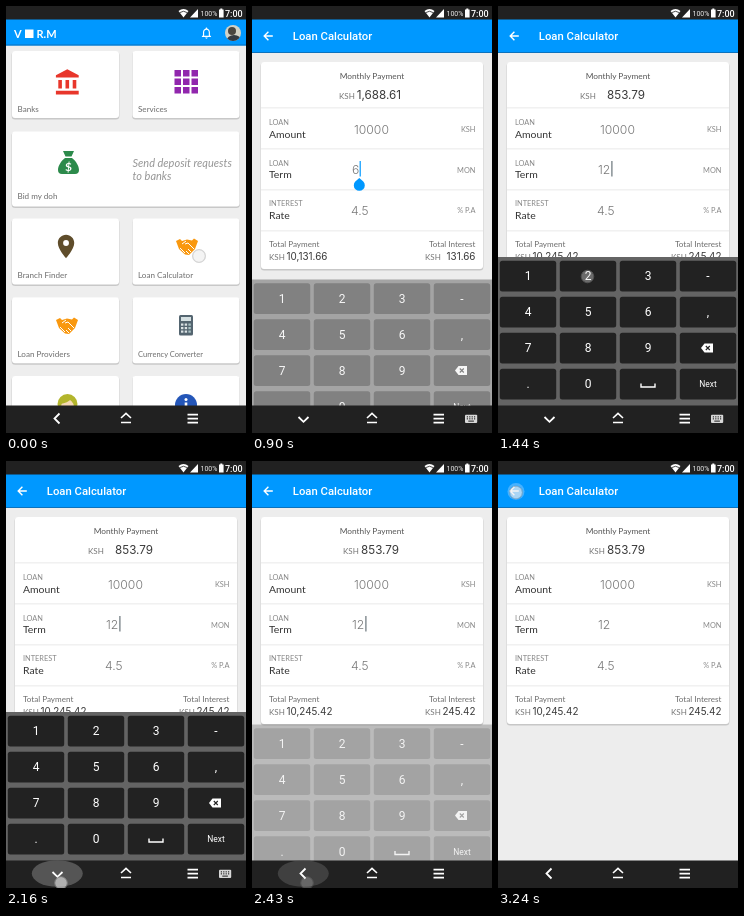
An HTML page for the animation above (3.27 s loop, 240 by 427 pixels).

```html
<!DOCTYPE html>
<html lang="en">
<head>
<meta charset="utf-8">
<title>Loan calculator</title>
<style>
html, body { margin: 0; width: 100%; height: 100%; overflow: hidden; background: #212121; }
svg { display: block; width: 100vw; height: 100vh; font-family: Lato, "Open Sans", sans-serif; }
.sys { font-family: Roboto, "Noto Sans", sans-serif; }
.label { font-size: 8.1px; fill: #6c6c6c; }
.cap { font-size: 7.4px; fill: #888; }
.name { font-size: 10.4px; fill: #333; }
.ksh { font-size: 8px; fill: #777; }
.input, .sum, .big { font-family: Inter, "Open Sans", sans-serif; fill: #3a3a3a; }
.input { font-size: 12.2px; font-weight: 300; fill: #777; }
.sum { font-size: 9.9px; }
.big { font-size: 11.7px; }
.line { fill: none; stroke: #fff; stroke-width: 1.8; }
.bold { font-weight: 700; fill: #fff; }
.title { font-size: 11.3px; font-weight: 500; fill: #fff; }
.end { text-anchor: end; }
.mid { text-anchor: middle; }
</style>
</head>
<body>
<svg id="stage" viewBox="0 0 240 427" preserveAspectRatio="none"></svg>
<script>
const LOOP = 3270, STEP = 30;
const BLUE = '#0098ff', EDGE = '#0b72bd', BAR = '#212121', KEY = '#222', KEY_DOWN = '#2e2e2e';

const text = (x, y, cls, str, more = '') => `<text x="${x}" y="${y}" class="${cls}" ${more}>${str}</text>`;
const rect = (x, y, w, h, fill, more = '') => `<rect x="${x}" y="${y}" width="${w}" height="${h}" fill="${fill}" ${more}/>`;
const path = (d, more = '') => `<path d="${d}" ${more}/>`;
const at = (x, y, s, body) => `<g transform="translate(${x} ${y}) scale(${s})">${body}</g>`;
const card = (x, y, w, h) =>
  rect(x - .4, y + .6, w + .8, h + .9, '#000', 'rx="3.5" opacity=".16"') + rect(x, y, w, h, '#fff', 'rx="3"');
const grid = (cols, rows, fn) =>
  Array.from({ length: cols * rows }, (_, i) => fn(i % cols, Math.floor(i / cols), i)).join('');
const appBar = bottom => rect(0, 13, 240, bottom - 13, BLUE) + rect(0, bottom - 1, 240, 1, EDGE);

const handshake = (x, y) => at(x, y, 1, `<g fill="#f9980f">
  ${path('M-11 -6L-7 -8L-5 -6L0 -7.5L5 -6.5L7 -8.5L11 -6L8 2L2 8L-2 7.5L-8 2Z')}</g>
  ${path('M-5 -3L-1 -6M-2 -3L1 -4L7 2M-7 1L-2 6M1 2L4 5M-1 4L2 7', 'fill="none" stroke="#fff" stroke-width="1"')}`);

function home() {
  const bank = path('M4 10v7h3v-7zM10 10v7h3v-7zM2 22h19v-3H2zM16 10v7h3v-7zM11.5 1L2 6v2h19V6z', 'fill="#e8362b"');
  const pin = path('M12 2C8.1 2 5 5.1 5 9c0 5.3 7 13 7 13s7-7.7 7-13c0-3.9-3.1-7-7-7zm0 9.5a2.5 2.5 0 1 1 0-5 2.5 2.5 0 0 1 0 5z', 'fill="#5f4d2b"');
  const bell = path('M12 22c1.1 0 2-.9 2-2h-4c0 1.1.9 2 2 2zM18 16v-5c0-3-1.6-5.6-4.5-6.3V4a1.5 1.5 0 0 0-3 0v.7C7.6 5.4 6 8 6 11v5l-2 2v1h16v-1zM16 17H8v-6c0-2.5 1.5-4.5 4-4.5s4 2 4 4.5z', 'fill="#fff" fill-rule="evenodd"');
  const bag = path('M57 145h11l-2.5 5.5h-6zM59 152h7c4 3 7 8 7 12q0 4-4 4h-13q-4 0-4-4c0-4 3-9 7-12z', 'fill="#2c8a4b"')
    + text(62.5, 165, 'mid', '$', 'font-size="12" font-weight="700" fill="#fff"');
  const calc = rect(173, 309, 14, 20.5, '#546570', 'rx="1.5"') + rect(175, 311, 10, 4, '#d5e0e2')
    + grid(3, 3, (c, r) => rect(175 + c * 3.7, 317.5 + r * 3.5, 2.4, 2.2, c == 2 ? '#a9c2c4' : '#dce3e5'));
  const face = '<ellipse cx="61.5" cy="398" rx="10" ry="10" fill="#b3b52c"/>'
    + '<ellipse cx="61.5" cy="401" rx="6.5" ry="7.5" fill="#f6d9b6"/>' + path('M54 398q8-1 11-5q1 4 4 5l-1-7h-13z', 'fill="#b3b52c"');
  const info = '<circle cx="180" cy="399" r="11" fill="#2456b8"/><circle cx="180" cy="393.5" r="1.5" fill="#fff"/>' + rect(178.7, 396.5, 2.6, 9, '#fff');
  const person = '<clipPath id="round"><circle cx="227" cy="27" r="8"/></clipPath><g clip-path="url(#round)">'
    + rect(219, 19, 16, 16, '#d3d2c6') + '<circle cx="226" cy="25" r="4" fill="#494640"/><ellipse cx="228" cy="35" rx="7.5" ry="6" fill="#353b42"/></g>';

  return rect(0, 13, 240, 387, '#eee')
    + card(6, 45, 107, 67) + card(126.5, 45, 107, 67) + card(6, 125.5, 227.5, 75)
    + grid(2, 3, (c, r) => card(6 + c * 120.5, 212.5 + r * 78.7, 107, 66))
    + at(47.5, 62, 1.2, bank)
    + grid(3, 3, (c, r) => rect(168.5 + c * 8.5, 64 + r * 8.5, 6.5, 6.5, '#9127ad'))
    + bag + at(46, 226.5, 1.17, pin) + handshake(181, 241) + handshake(61, 320) + calc + face + info
    + [[11.5, 106, 'Banks'], [132, 106, 'Services'], [11.5, 193, 'Bid my doh'], [11.5, 272, 'Branch Finder'],
       [132, 272, 'Loan Calculator'], [11.5, 351, 'Loan Providers']].map(a => text(a[0], a[1], 'label', a[2])).join('')
    + text(132, 351, 'label', 'Currency Converter', 'style="font-size:7.5px"')
    + ['Send deposit requests', 'to banks'].map((s, i) => text(126.5, 161 + i * 12.5, '', s, 'font-size="11" font-style="italic" fill="#969696"')).join('')
    + appBar(39.5)
    + text(8, 32, 'bold', 'V', 'font-size="11"') + rect(19, 23.5, 8.5, 8.5, '#fff') + text(30.5, 32, 'bold', 'R.M', 'font-size="11"')
    + at(193.5, 20, .58, bell) + person;
}

function calculator() {
  const row = (y, cap, name, unit) => text(17, y, 'cap', cap) + text(17, y + 12.5, 'name', name) + text(223.5, y + 7, 'cap end', unit);
  return rect(0, 13, 240, 418, '#ededed') + card(9, 56, 222, 207)
    + [101.5, 142.5, 183.5, 224.5].map(y => rect(9, y, 222, .8, '#e3e3e3')).join('')
    + text(120, 72.5, 'mid', 'Monthly Payment', 'font-size="8.3" fill="#555"')
    + text(87, 93, 'ksh', 'KSH', 'id="ksh"') + text(105, 93, 'big', '', 'id="monthly"')
    + row(119, 'LOAN', 'Amount', 'KSH') + row(159.5, 'LOAN', 'Term', 'MON') + row(200, 'INTEREST', 'Rate', '% P.A')
    + text(102, 128, 'input', '10000') + text(100, 168, 'input', '', 'id="term"') + text(99, 208.5, 'input', '4.5')
    + text(17, 241, 'label', 'Total Payment') + text(223.5, 241, 'label end', 'Total Interest')
    + text(17, 254, 'ksh', 'KSH') + text(34.5, 254, 'sum', '', 'id="total"')
    + text(173, 254, 'ksh', 'KSH', 'id="ksh2"') + text(223.5, 254, 'sum end', '', 'id="interest"')
    + rect(102, 115, 1.2, 15.5, BLUE, 'id="caret"')
    + path('M107.3 172l4 3.6a5.5 5.5 0 1 1-8 0z', `id="handle" fill="${BLUE}"`)
    + appBar(47)
    + '<circle id="backGlow" cx="18" cy="30.5" r="8.5" fill="#8ccbff"/>'
    + path('M20.8 30h-8.4M16.4 25.8l-4.2 4.2l4.2 4.2', 'class="line" style="stroke-width:1.4"')
    + text(40.8, 34, 'sys title', 'Loan Calculator');
}

function keyboard() {
  const keys = ['1', '2', '3', '-', '4', '5', '6', ',', '7', '8', '9', '', '.', '0', '', 'Next'];
  return rect(0, 251, 240, 180, '#646464')
    + grid(4, 4, (c, r, i) => rect(1.8 + c * 60, 254.8 + r * 36, 56.4, 30.6, KEY, `id="key${i}" rx="2.5"`)
      + text(30 + c * 60, (i == 15 ? 381 : 274.2 + r * 36), 'sys mid', keys[i], `fill="#fff" font-size="${i == 15 ? 8.5 : 12}"`))
    + path('M203 342l3.5-4.5h8.5v9h-8.5z', 'fill="#fff"') + path('M207.8 340l4 4m0-4l-4 4', `stroke="${KEY}" stroke-width="1.1"`)
    + path('M143 377.5v3.5h14v-3.5', 'class="line" style="stroke-width:1.4"');
}

function statusBar() {
  return rect(0, 0, 240, 13.5, BAR)
    + path('M172.5 5q5-4 10 0l-5 6.5zM184 11.5h8v-8.5z', 'fill="#fff"')
    + path('M173.8 6.6q3.7-2.7 7.4 0', `fill="none" stroke="${BAR}" stroke-width=".8"`)
    + text(194.5, 10.2, 'sys', '100%', 'font-size="7" fill="#eee"')
    + path('M213 3.5h1.3v-1h2v1h1.3v8h-4.600z', 'fill="#fff"')
    + text(219, 10.8, 'sys', '7:00', 'font-size="9" font-weight="500" fill="#fff"');
}

function navBar() {
  return rect(0, 399.5, 240, 28, BAR)
    + '<ellipse id="navGlow" cx="51.3" cy="412.5" rx="25.5" ry="13.3" fill="#555"/>'
    + path('M53.5 407.5l-5 5l5 5', 'id="navBack" class="line"')
    + `<g id="navHide">${path('M46.5 411l5 4.8l5-4.8', 'class="line"')}`
    + rect(213, 408.7, 12.2, 8.2, '#d8d8d8', 'rx="1"')
    + grid(4, 2, (c, r) => rect(214.8 + c * 2.4, 410.3 + r * 2, 1.2, 1.1, BAR)) + rect(216.3, 414.6, 5.6, 1, BAR) + '</g>'
    + path('M115 412l5-4.6l5 4.600M115 416.5h10', 'class="line" style="stroke-width:1.6"')
    + path('M181.5 408.7h10.5M181.5 412.7h10.5M181.5 416.7h10.5', 'class="line"');
}

document.getElementById('stage').innerHTML = home()
  + `<g id="calc">${calculator()}</g><g id="keys">${keyboard()}</g>` + navBar() + statusBar()
  + '<g id="touch"><circle r="7" fill="#000" opacity=".13"/><circle r="5.9" fill="#fff" opacity=".62"/>'
  + '<circle r="6.3" fill="none" stroke="#bbb" stroke-width=".7" opacity=".8"/></g>';

const $ = Object.fromEntries([...document.querySelectorAll('[id]')].map(e => [e.id, e]));
const set = (e, o) => { for (const k in o) e.setAttribute(k, o[k]); };
const show = (e, on) => set(e, { opacity: +on });

// Linear track through [time, value] points
function track(t, pts) {
  if (t <= pts[0][0]) return pts[0][1];
  for (let i = 1; i < pts.length; i++) {
    const [a, u] = pts[i - 1], [b, v] = pts[i];
    if (t < b) return u + (v - u) * (t - a) / (b - a);
  }
  return pts[pts.length - 1][1];
}

// x, y, press, release, faded
const taps = [
  [193, 250, -60, 60, 180], [109, 168.5, 390, 600, 720], [209, 342, 990, 1050, 1110],
  [30, 270, 1140, 1230, 1290], [89.5, 270.5, 1320, 1380, 1530], [55, 422, 2040, 2280, 2520], [18, 31.5, 3060, 3270, 3330]
];
const pressed = { key11: 2, key0: 3, key1: 4 };

// from, term, monthly, its x, KSH x, total, interest
const results = [
  [0, '6', '1,688.61', 104.7, 87, '10,131.66', '131.66'],
  [1050, '', '1,688.61', 104.7, 87, '10,131.66', '131.66'],
  [1200, '1', '10,037.50', 100, 82, '10,037.50', '37.50'],
  [1380, '12', '853.79', 109, 82, '10,245.42', '245.42'],
  [2370, '12', '853.79', 109, 91, '10,245.42', '245.42']
];

function draw(t) {
  const open = track(t, [[0, 0], [60, .35], [90, .65], [120, .87], [150, .97], [180, 1]]);
  set($.calc, { opacity: open, transform: `translate(0 ${34 * (1 - open)})` });

  const r = results.filter(a => t >= a[0]).pop();
  $.term.textContent = r[1];
  $.monthly.textContent = r[2];
  set($.monthly, { x: r[3] });
  set($.ksh, { x: r[4] });
  $.total.textContent = r[5];
  $.interest.textContent = r[6];
  set($.ksh2, { x: r[1] == '1' ? 178 : 173 });

  const inTerm = t >= 660;
  const typed = t >= 1050;
  set($.caret, {
    x: !inTerm ? 102 : r[1] == '12' ? 113.3 : 100 + 7.6 * r[1].length,
    y: inTerm ? 155 : 115,
    fill: typed ? '#6a757b' : BLUE,
    opacity: +(t < 1470 || (t >= 1950 && t < 2460))
  });
  show($.handle, inTerm && !typed);

  const rise = track(t, [[810, 55], [840, 44], [870, 33], [900, 22.5], [930, 12], [960, 4.5], [990, 0],
    [2370, 0], [2430, 12.5], [2490, 22]]);
  const alpha = track(t, [[810, 0], [870, .35], [900, .53], [930, .74], [960, .92], [990, 1], [2370, 1], [2430, .36], [2490, 0]]);
  set($.keys, { opacity: alpha, transform: `translate(0 ${rise})` });
  for (const k in pressed) {
    const tap = taps[pressed[k]];
    set($[k], { fill: t >= tap[2] && t < tap[3] ? KEY_DOWN : KEY });
  }

  const ime = t >= 840 && t < 2400;
  show($.navHide, ime);
  show($.navBack, !ime);
  set($.navGlow, { opacity: track(t, [[2040, 0], [2130, 1], [2340, 1], [2430, .6], [2550, 0]]) });
  set($.backGlow, { opacity: track(t, [[3090, 0], [3210, .5]]) });

  const tap = taps.find(a => t >= a[2] && t < a[4]);
  if (tap) {
    const [x, y, a, b, c] = tap;
    set($.touch, { transform: `translate(${x} ${y})`, opacity: track(t, [[a, 0], [a + 60, .9], [b, .9], [c, 0]]) });
  } else show($.touch, false);
}

const start = performance.now();
function tick() {
  const t = (performance.now() - start) % LOOP;
  draw(Math.floor(t / STEP) * STEP);
  requestAnimationFrame(tick);
}
tick();
</script>
</body>
</html>
```
